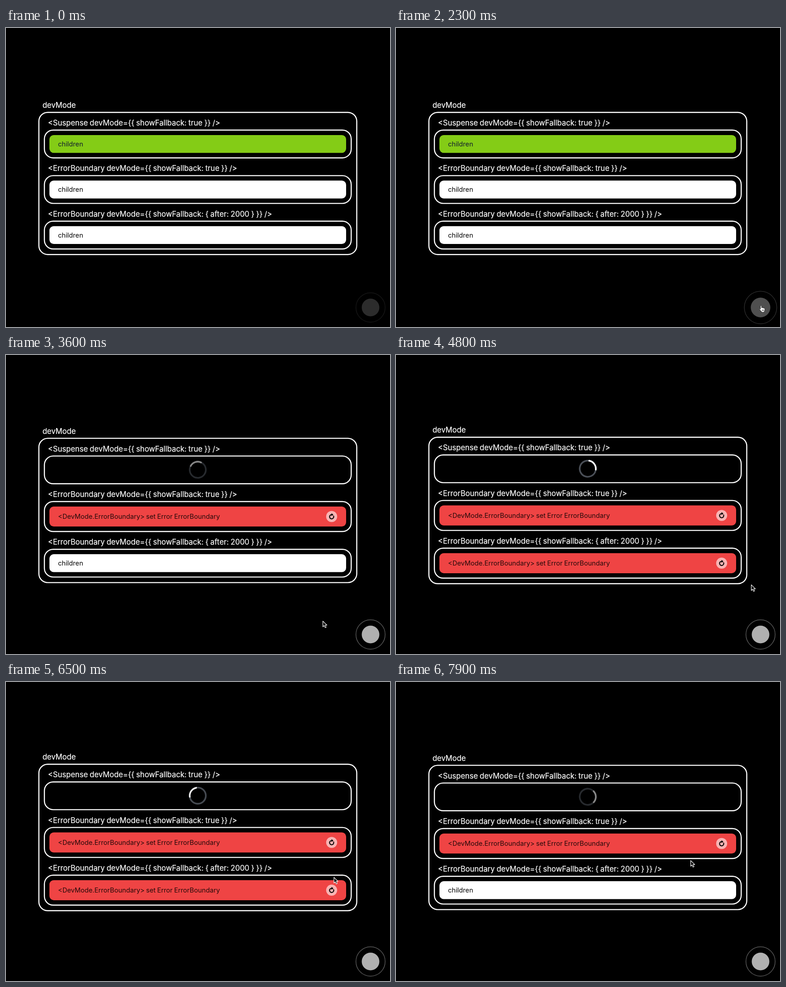
Recreate the animation shown at these times as an HTML page. Size 849 by 659 pixels, loop 8000 ms.

```html
<!DOCTYPE html>
<html lang="en">
<head>
<meta charset="utf-8">
<title>devMode</title>
<style>
  html, body { margin: 0; width: 100%; height: 100%; overflow: hidden; background: #000; }
  svg { display: block; }
  text { font: 400 14.65px Inter, "Open Sans", sans-serif; word-spacing: -0.7px; }
  .label { font-size: 16.6px; fill: #fff; stroke: #fff; stroke-width: 0.2; }
  .frame { fill: none; stroke: #fff; stroke-width: 2.4; }
</style>
</head>
<body>
<svg id="stage" width="849" height="659" viewBox="0 0 849 659"></svg>
<script>
const LOOP = 8000;
const TOGGLE = 2750;            // dev mode switched on
const TIMEOUT = TOGGLE + 2000;  // third boundary fails
const RESET = 7300;             // third boundary restored
const ERROR_TEXT = '<DevMode.ErrorBoundary> set Error ErrorBoundary';

const stage = document.getElementById('stage');

function add(parent, tag, attrs = {}, content) {
  const el = document.createElementNS('http://www.w3.org/2000/svg', tag);
  set(el, attrs);
  if (content) el.textContent = content;
  parent.append(el);
  return el;
}
function set(el, attrs) {
  for (const key in attrs) el.setAttribute(key, attrs[key]);
}
const show = (el, on) => set(el, { visibility: on ? 'visible' : 'hidden' });
const moveTo = (el, x, y) => set(el, { transform: `translate(${x} ${y})` });

// Panel
const panel = add(stage, 'g');
add(panel, 'text', { x: 80.7, y: -9, class: 'label' }, 'devMode');
const outer = add(panel, 'rect', { x: 72.7, y: 1, width: 702.8, rx: 19.5, class: 'frame' });

const ROWS = [
  ['<Suspense devMode={{ showFallback: true }} />', '#84cc16'],
  ['<ErrorBoundary devMode={{ showFallback: true }} />', '#fff'],
  ['<ErrorBoundary devMode={{ showFallback: { after: 2000 } }} />', '#fff'],
].map(([label, color]) => {
  const g = add(panel, 'g');
  add(g, 'text', { x: 92.8, y: -9, class: 'label' }, label);
  const frame = add(g, 'rect', { x: 84.9, y: 1, width: 678.3, rx: 19.5, class: 'frame' });
  const fill = add(g, 'rect', { x: 96, y: 11.9, width: 656, rx: 9.5 });
  const text = add(g, 'text', { x: 115 });
  const retry = add(g, 'g', { transform: 'translate(720 34)' });
  add(retry, 'circle', { r: 12.2, fill: '#fff', 'fill-opacity': 0.6 });
  add(retry, 'path', { d: 'M0-4.1A4.6 4.6 0 1 0 4.3-1.2', fill: 'none', stroke: '#000', 'stroke-width': 2.1, 'stroke-linecap': 'round' });
  add(retry, 'path', { d: 'M-.4-7.3L3.9-4.1L-.4-.9Z' });
  return { g, color, frame, fill, text, retry };
});

const spinner = add(ROWS[0].g, 'g');
add(spinner, 'circle', { r: 17.8, fill: 'none', stroke: '#4b5058', 'stroke-width': 3.6 });
const rad = deg => deg * Math.PI / 180;
const onRing = deg => `${17.8 * Math.sin(rad(deg))} ${-17.8 * Math.cos(rad(deg))}`;
add(spinner, 'path', {
  d: `M${onRing(-8)}A17.8 17.8 0 0 1 ${onRing(78)}`,
  fill: 'none', stroke: '#fff', 'stroke-width': 3.6, 'stroke-linecap': 'round',
});

// Round toggle
const toggle = add(stage, 'g');
add(toggle, 'circle', { r: 32.3, fill: '#000', stroke: '#6a6a6a', 'stroke-width': 1.2 });
add(toggle, 'circle', { r: 19.5, fill: '#b0b0b0' });

// Pointers
const arrow = add(stage, 'path', {
  d: 'M.5.5V13L3.5 10.3L5.6 15L7.9 14L5.9 9.4H9.6Z',
  fill: '#111', stroke: '#fff', 'stroke-width': 1.1, 'stroke-linejoin': 'round',
});
const hand = add(stage, 'path', {
  d: 'M2.8 9V1.9Q2.8.6 4 .6T5.3 1.9V5.8Q5.6 4.7 6.6 4.9T7.8 6.3Q8.1 5.3 9.2 5.6T10.3 7Q10.8 6.2 11.7 6.7T12.5 8.2V10.7Q12.4 12.4 11.2 13.6V15.4H5V13.9Q3.4 12.5.6 8.9Q.2 8 1 7.6T2.8 9M6.6 9.6V12.6M8.4 9.6V12.6M10.2 9.6V12.6',
  fill: '#fff', stroke: '#111', 'stroke-width': 0.8, 'stroke-linejoin': 'round',
});

// [time, x, y] of the pointer tip
const PATH = [
  [200, 813, 257], [500, 790, 390], [900, 772, 586], [1150, 772, 586],
  [1500, 797, 594], [2000, 800, 597], [2300, 803, 611], [2900, 803, 611],
  [3500, 700, 586], [3700, 700, 586], [4300, 785, 506], [4950, 785, 506],
  [5400, 757, 462], [6200, 724.5, 430], [6600, 724.5, 430], [7000, 719.5, 462],
  [7450, 719.5, 462], [7850, 651, 393], [8000, 651, 393],
];
const ease = p => p * p * (3 - 2 * p);
const ramp = (t, from, span) => ease(Math.min(1, Math.max(0, (t - from) / span)));

function pointerAt(t) {
  const i = PATH.findIndex(step => step[0] > t);
  const [t0, x0, y0] = PATH[i - 1], [t1, x1, y1] = PATH[i];
  const p = ease((t - t0) / (t1 - t0));
  return [x0 + (x1 - x0) * p, y0 + (y1 - y0) * p];
}

function drawPanel(t) {
  const on = t >= TOGGLE;
  const failed = [false, on, t >= TIMEOUT && t < RESET];
  const errors = failed.filter(Boolean).length;
  moveTo(panel, 0, 185 - 2.4 * errors);
  let y = 39;
  ROWS.forEach((row, i) => {
    const bad = failed[i], waiting = on && i === 0;
    const height = bad ? 67.6 : 62.8;
    moveTo(row.g, 0, y);
    set(row.frame, { height: height - 1.6 });
    set(row.fill, { height: height - 23.4, fill: bad ? '#ef4444' : row.color });
    set(row.text, { y: bad ? 39 : 36.8, fill: bad ? '#240a0a' : i ? '#000' : '#101a30' });
    row.text.textContent = bad ? ERROR_TEXT : 'children';
    show(row.fill, !waiting);
    show(row.text, !waiting);
    show(row.retry, bad);
    y += height + 37.6;
  });
  set(outer, { height: y - 37.6 + 10.6 });

  const age = t - TOGGLE;
  show(spinner, on);
  set(spinner, {
    transform: `translate(424 31.4) rotate(${age * 0.36})`,
    opacity: 0.75 + 0.25 * Math.cos(age * Math.PI / 1000),
  });
}

function drawPointer(t) {
  const visible = t >= 200;
  const [x, y] = visible ? pointerAt(t) : [0, 0];
  const overToggle = t > 1250 && t < 3100;
  const overRetry = t > 6850 && t < 7550;
  const pressing = overToggle || overRetry;
  show(arrow, visible && !pressing);
  show(hand, visible && pressing);
  moveTo(arrow, x, y);
  moveTo(hand, x, y);
}

function drawToggle(t) {
  const hover = ramp(t, 1250, 200) - ramp(t, 3100, 200);
  const lit = ramp(t, TOGGLE, 200);
  const dim = 0.25 + 0.2 * hover;
  set(toggle, {
    transform: `translate(806 616) scale(${1 + 0.11 * hover})`,
    opacity: dim + (1 - dim) * lit,
  });
}

const start = performance.now();
function tick() {
  const t = (performance.now() - start) % LOOP;
  drawPanel(t);
  drawToggle(t);
  drawPointer(t);
  requestAnimationFrame(tick);
}
tick();
</script>
</body>
</html>
```
